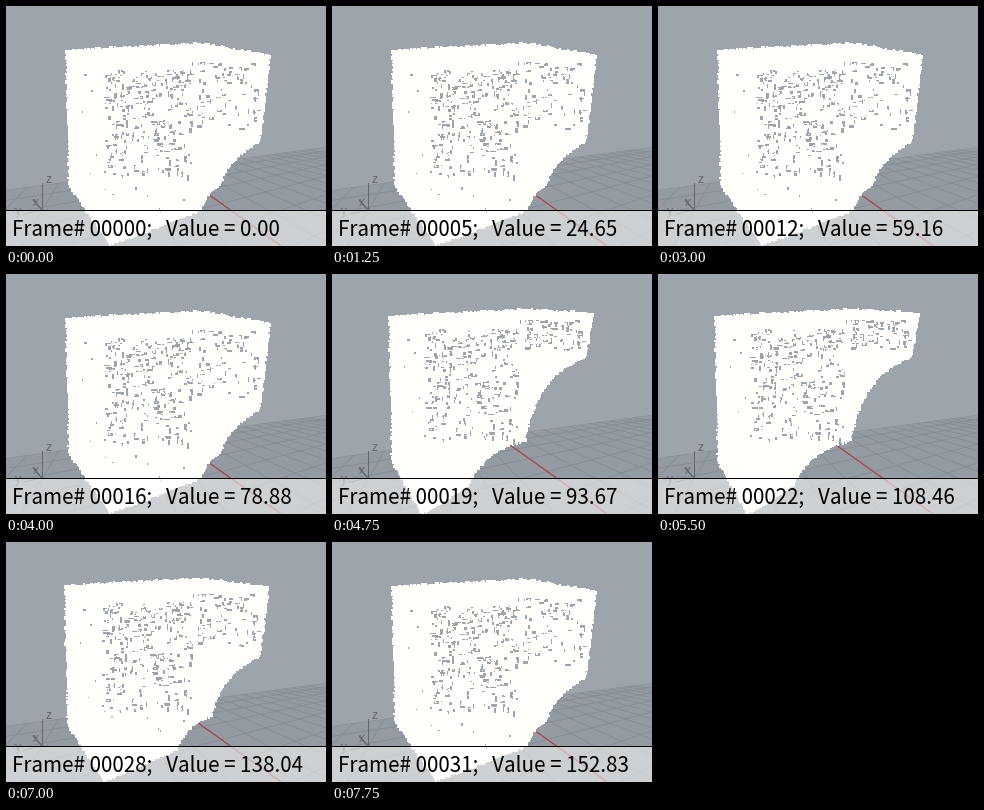
These frames come from a looping animation (320x240 px, 8000 ms). A matplotlib script:

```python
import numpy as np
import matplotlib.pyplot as plt
from matplotlib.animation import FuncAnimation
from matplotlib.collections import LineCollection, PolyCollection
from matplotlib.patches import Polygon, Rectangle

W, H, DPI = 320, 240, 100
FRAMES, INTERVAL = 32, 250
STEP = 4.93
PX = 72 / DPI
BACK, GROUND, GRID, SOLID = "#9da4ab", "#949ba2", "#868d94", "#fffffc"


def ramp(x):
    x = np.clip(x, 0, 1)
    return x * x * (3 - 2 * x)


def blend(n):
    """0 is the plain block, 1 the curved cut."""
    return ramp((n - 16) / 3.2) * ramp((30 - n) / 4.6)


def outline(corners, bites, per_side=36):
    """Closed outline; bites maps a side to its curve control point."""
    t = np.linspace(0, 1, per_side, endpoint=False)[:, None]
    sides = []
    for i, p in enumerate(np.array(corners, float)):
        q = np.array(corners[(i + 1) % len(corners)])
        c = np.array(bites.get(i, (p + q) / 2))
        sides.append((1 - t) ** 2 * p + 2 * t * (1 - t) * c + t ** 2 * q)
    return np.vstack(sides)


def rects(corner, size):
    x, y = np.round(corner).T
    w, h = size.T
    return np.stack([np.column_stack(p) for p in (
        (x, y), (x + w, y), (x + w, y + h), (x, y + h))], axis=1)


block = outline([(61, 45), (192, 38), (263, 50), (253, 136), (213, 179),
                 (194, 204), (105, 238), (64, 180)],
                {3: (222, 150), 4: (199, 185)})
curved = outline([(58, 43), (190, 36), (260, 40), (252, 84), (192, 166),
                  (134, 212), (90, 239), (61, 188)],
                 {3: (205, 97), 4: (150, 176)})

rng = np.random.default_rng(4)
edge_size = rng.integers(2, 5, block.shape)
edge_shift = rng.uniform(-.8, .8, block.shape) - edge_size / 2


class Gaps:
    """Small broken openings spread over one face of the solid."""

    def __init__(self, count, box_from, box_to, fade, longest):
        self.u = rng.random((count, 2)) ** (1, fade)
        self.boxes = np.array(box_from, float), np.array(box_to, float)
        thin = rng.integers(1, 4, count)
        long = rng.integers(2, longest + 1, count)
        upright = rng.random(count) < .5
        self.size = np.column_stack([np.where(upright, thin, long),
                                     np.where(upright, long, thin)])
        self.chip_shift = rng.integers(-1, 4, (count, 2))
        self.chip_size = rng.integers(1, 4, (count, 2))

    def verts(self, k):
        a, b = self.boxes
        box = a + k * (b - a)
        pos = np.round(box[:2] + self.u * (box[2:] - box[:2]))
        return (rects(pos, self.size),
                rects(pos + self.chip_shift, self.chip_size))


faces = [
    Gaps(230, (98, 64, 184, 172), (92, 55, 184, 168), 1.3, 6),
    Gaps(70, (186, 55, 254, 122), (188, 45, 252, 74), 1.3, 5),
    Gaps(40, (74, 60, 182, 208), (70, 60, 182, 166), 1, 3),
]

fig = plt.figure(figsize=(W / DPI, H / DPI), dpi=DPI, facecolor=BACK)
ax = fig.add_axes([0, 0, 1, 1])
ax.set(xlim=(0, W), ylim=(H, 0))
ax.axis("off")


def add_floor():
    floor = Polygon([(0, 184), (W, 141), (W, H), (0, H)], fc=GROUND, ec="none")
    ax.add_patch(floor)
    near, far = (92, 110), (548, 110)
    reach = 400
    lines = []
    for k in range(-10, 13):
        run = 1.41 + .4 * k
        drop = reach if run > -2.4 else 0
        lines.append([near, (near[0] + run * drop, near[1] + drop)])
    for j in range(8):
        run = 7.4 - .9 * j
        lines.append([far, (far[0] - run * reach, far[1] + reach)])
    grid = LineCollection(lines, colors=GRID, linewidths=PX * .9)
    ax.add_collection(grid)
    grid.set_clip_path(floor)
    ax.plot([170, 275], [165.3, 239.9], color="#a94347", lw=PX * 1.2)


def add_axis_icon():
    gray = "#62676c"
    ax.plot([36, 36], [177, 204], color=gray, lw=PX)
    ax.plot([36, 27, 36, 18], [204, 194, 204, 208], color=gray, lw=PX * .8)
    for name, x, y in (("z", 42, 177), ("x", 30, 200), ("y", 12, 209)):
        ax.text(x, y, name, color=gray, fontsize=12 * PX, ha="center",
                va="baseline", family="Liberation Sans")


def add_rects(color, z):
    group = PolyCollection([], facecolors=color, edgecolors="none",
                           antialiaseds=False, zorder=z)
    ax.add_collection(group)
    return group


add_floor()
add_axis_icon()
body = Polygon(block, fc=SOLID, ec="none", aa=False, zorder=3)
ax.add_patch(body)
rim = add_rects(SOLID, 4)
gaps = add_rects(BACK, 5)
chips = add_rects(SOLID, 6)

ax.add_patch(Rectangle((0, 205), W, 35, fc="white", alpha=.54, ec="none",
                       zorder=7))
ax.add_patch(Rectangle((0, 204), W, 1, fc="black", ec="none", aa=False,
                       zorder=8))
caption = ax.text(5.5, 229.7, "", fontsize=20.6 * PX, color="black",
                  va="baseline", family="Noto Sans CJK JP", zorder=9)


def draw(n):
    k = blend(n)
    edge = block + k * (curved - block)
    body.set_xy(edge)
    rim.set_verts(rects(edge + edge_shift, edge_size))

    holes, bits = zip(*(face.verts(k) for face in faces))
    gaps.set_verts(np.concatenate(holes))
    chips.set_verts(np.concatenate(bits))

    caption.set_text(f"Frame# {n:05d};   Value = {n * STEP:.2f}")
    return body, rim, gaps, chips, caption


anim = FuncAnimation(fig, draw, frames=FRAMES, interval=INTERVAL,
                     repeat=True, repeat_delay=0, blit=False)
plt.show()
```
